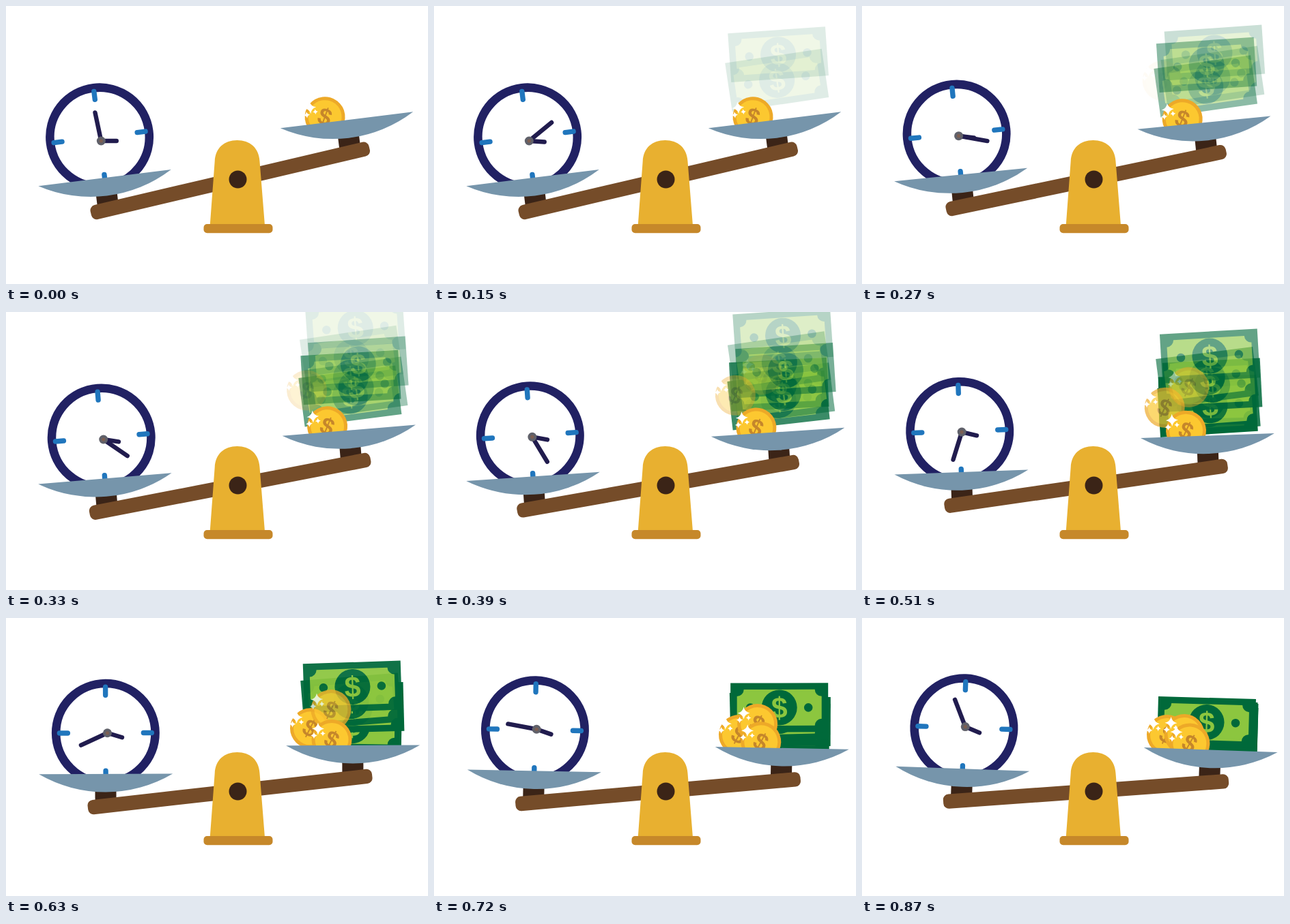
Recreate the animation shown at these times as an HTML page. Size 618x408 px, loop 900 ms.

```html
<!DOCTYPE html>
<html lang="en">
<head>
<meta charset="utf-8">
<title>Time and money on a balance</title>
<style>
  html, body { margin: 0; width: 100%; height: 100%; overflow: hidden; background: #fff; }
  svg { display: block; width: 100vw; height: 100vh; }
  text { font-family: "Liberation Sans", Arial, sans-serif; font-weight: 700; text-anchor: middle; }
</style>
</head>
<body>
<svg viewBox="0 0 618 408">
  <defs>
    <g id="bill">
      <rect x="-71.5" y="-36" width="143" height="72" fill="#00693a"/>
      <path d="M-52-26.5H52A10 10 0 0 0 62-16.5V16.5A10 10 0 0 0 52 26.5H-52A10 10 0 0 0-62 16.5V-16.5A10 10 0 0 0-52-26.5Z" fill="#8cc63f"/>
      <g fill="#00693a">
        <circle r="26"/>
        <circle cx="-42.5" r="6.3"/>
        <circle cx="42.5" r="6.3"/>
      </g>
      <text y="15" font-size="43" fill="#8cc63f">$</text>
    </g>
    <path id="star" d="M0-9Q1.500-1.500 9 0Q1.500 1.500 0 9Q-1.500 1.500-9 0Q-1.500-1.500 0-9Z" fill="#fff"/>
    <g id="coin">
      <circle r="29.5" fill="#eda928"/>
      <circle r="24.5" fill="#fcc830"/>
      <text transform="rotate(27)" y="12" font-size="35" fill="#c5862b">$</text>
      <use href="#star" x="-20" y="-16"/>
      <use href="#star" transform="translate(-26 -6) scale(.55)"/>
      <use href="#star" transform="translate(-13 -9) scale(.45)"/>
    </g>
    <path id="pan" d="M0 0H196A194 194 0 0 1 0 0Z" fill="#7695ab"/>
    <g id="hand" stroke-linecap="round">
      <path stroke="#211c4e" stroke-width="6.6"/>
      <path stroke="#2e1a20" stroke-width="3.8"/>
    </g>
  </defs>

  <g class="tilt">
    <g transform="translate(146.2 168)">
      <circle r="72.7" fill="#fff" stroke="#212163" stroke-width="12.6"/>
      <path d="M0-67.5V-55.5M0 67.5V55.5M-67.5 0H-55.5M67.5 0H55.5" stroke="#2076bd" stroke-width="7.4" stroke-linecap="round"/>
    </g>
  </g>

  <g id="hands" stroke-linecap="round" stroke="#211c4e" stroke-width="6.4">
    <path id="hour" d="M0 0V-22.5"/>
    <path id="minute" d="M0 0V-42.5"/>
    <g stroke="none">
      <circle r="6.5" fill="#60616a"/>
      <circle r="2.6" fill="#7d5f52"/>
    </g>
  </g>

  <g id="money"></g>

  <g class="tilt">
    <use href="#coin" x="477.3" y="179"/>
    <g fill="#3b2417">
      <rect x="130.5" y="244" width="31" height="32"/>
      <rect x="492.5" y="203" width="31" height="32"/>
    </g>
    <use href="#pan" x="48.3" y="228.2"/>
    <use href="#pan" x="410.4" y="187.5"/>
    <rect x="118.5" y="243" width="419" height="21.4" rx="8" fill="#754c29" transform="rotate(-6.2 339.5 254)"/>
  </g>

  <path d="M298.700 322L305.7 228C306.5 208 320 197 338.5 197S370.5 208 371.5 228L379 322Z" fill="#e8b030"/>
  <rect x="289.5" y="320" width="101" height="13.3" rx="5" fill="#c6882a"/>
  <circle cx="339.5" cy="254.5" r="13" fill="#3b2417"/>
</svg>

<script>
const LOOP = 900, STEP = 30, SETTLE = 780;
const FADE = 370, FALL_POWER = 1.35;

// Back to front; each piece falls from one point to another while it fades in.
const pieces = [
  { kind: 'bill', rot: -8.4, start: 105, end: 640, from: [502, 107], to: [508, 160] },
  { kind: 'bill', rot: -4, start: 105, end: 640, from: [504, 68], to: [507, 158] },
  { kind: 'bill', rot: -8.4, start: 195, end: 640, from: [514, 99], to: [507, 160] },
  { kind: 'bill', rot: -4, start: 195, end: SETTLE, from: [517, 62], to: [508, 166] },
  { kind: 'bill', rot: -8.4, start: 285, end: SETTLE, from: [506, 62], to: [505, 160] },
  { kind: 'bill', rot: -4, start: 285, end: SETTLE, from: [512, 18], to: [504.5, 153] },
  { kind: 'coin', rot: -4, start: 255, end: 680, from: [440, 109], to: [446.5, 171.5] },
  { kind: 'coin', rot: -4, start: 345, end: SETTLE, from: [481, 88], to: [472, 170.5] },
];

const $ = id => document.getElementById(id);
const ramp = (t, a, b) => Math.min(1, Math.max(0, (t - a) / (b - a)));
const mix = (a, b, u) => a + (b - a) * u;
const tilts = document.querySelectorAll('.tilt');

for (const piece of pieces) {
  piece.el = document.createElementNS('http://www.w3.org/2000/svg', 'use');
  piece.el.setAttribute('href', '#' + piece.kind);
  $('money').append(piece.el);
}

function move(el, x, y, rot) {
  el.setAttribute('transform', `translate(${x} ${y}) rotate(${rot})`);
}

function draw(t) {
  const tilt = mix(-7.05, 2.05, ramp(t, 180, SETTLE));
  for (const el of tilts) el.setAttribute('transform', `rotate(${tilt} 339.5 254)`);

  const u = ramp(t, 150, SETTLE);
  move($('hands'), mix(139.3, 151.3, u), mix(198, 159.6, u), 0);
  move($('hour'), 0, 0, 90 + 0.0265 * t);
  move($('minute'), 0, 0, -12 + 0.42 * t - 1.9e-5 * t * t);

  for (const { el, rot, start, end, from, to } of pieces) {
    const fall = ramp(t, start, end) ** FALL_POWER;
    move(el, mix(from[0], to[0], fall), mix(from[1], to[1], fall), mix(rot, 1.6, fall * fall));
    el.setAttribute('opacity', ramp(t, start, start + FADE));
  }
}

const begin = performance.now();
function tick() {
  const t = (performance.now() - begin) % LOOP;
  draw(Math.floor(t / STEP) * STEP);
  requestAnimationFrame(tick);
}
tick();
</script>
</body>
</html>
```
